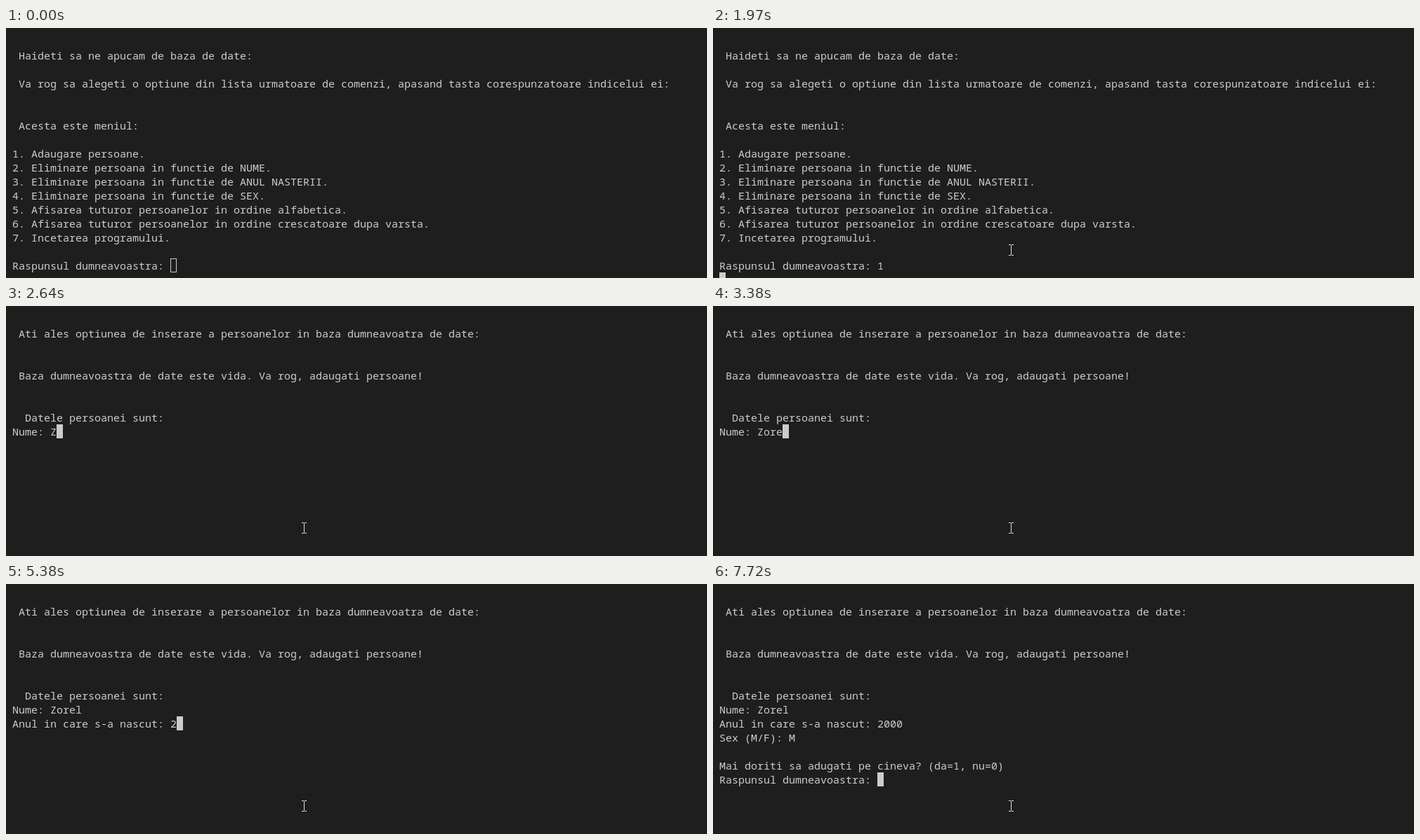
Write an HTML page that moves like this. It is 998 px wide and 357 px high and loops after 8000 ms.

```html
<!DOCTYPE html>
<html lang="ro">
<head>
<meta charset="utf-8">
<title>Terminal</title>
<style>
  html, body { margin: 0; width: 100%; height: 100%; overflow: hidden; background: #1e1e1e; }
  #stage { position: relative; width: 998px; height: 357px; overflow: hidden; background: #1e1e1e; }
  #screen {
    position: absolute; left: 9px; top: 9px; margin: 0; color: #ccc;
    font: 15px/20px "Noto Sans Mono", "DejaVu Sans Mono", monospace;
    font-variant-ligatures: none; white-space: pre;
  }
  #cursor { position: absolute; width: 9px; height: 20px; box-sizing: border-box; background: #ccc; }
  #cursor.hollow { background: none; border: 1px solid #ccc; }
  #pointer { position: absolute; left: 0; top: 0; width: 7px; height: 16px; }
  #pointer path { fill: none; stroke: #e4e4e4; shape-rendering: crispEdges; }
</style>
</head>
<body>
<div id="stage">
  <pre id="screen"></pre>
  <div id="cursor"></div>
  <svg id="pointer" viewBox="0 0 7 16"><path d="M0 .5h3m1 0h3M3.5 1v14M0 15.5h3m1 0h3"/></svg>
</div>
<script>
const LOOP = 8000, CELL = 9, ROW = 20, ORIGIN = 9;
const $ = id => document.getElementById(id);
const screen = $("screen"), cursor = $("cursor"), pointer = $("pointer");

const menu = `
 Haideti sa ne apucam de baza de date:

 Va rog sa alegeti o optiune din lista urmatoare de comenzi, apasand tasta corespunzatoare indicelui ei:


 Acesta este meniul:

1. Adaugare persoane.
2. Eliminare persoana in functie de NUME.
3. Eliminare persoana in functie de ANUL NASTERII.
4. Eliminare persoana in functie de SEX.
5. Afisarea tuturor persoanelor in ordine alfabetica.
6. Afisarea tuturor persoanelor in ordine crescatoare dupa varsta.
7. Incetarea programului.

Raspunsul dumneavoastra: `;

const form = `
 Ati ales optiunea de inserare a persoanelor in baza dumneavoatra de date:


 Baza dumneavoastra de date este vida. Va rog, adaugati persoane!


  Datele persoanei sunt:
Nume: `;

// [time, text to append, true to clear first]
const output = [
  [0, menu, true],
  [1300, "1"],
  [1970, "\n"],
  [2040, form, true],
  [2640, "Z"], [2830, "o"], [2970, "r"], [3380, "e"], [3440, "l"],
  [3840, "\n"],
  [3910, "Anul in care s-a nascut: "],
  [5380, "2"], [5470, "0"], [5600, "0"], [5800, "0"],
  [6270, "\nSex (M/F): "],
  [7260, "M"],
  [7720, "\n\nMai doriti sa adugati pe cineva? (da=1, nu=0)\nRaspunsul dumneavoastra: "]
];
const FOCUS = 1030;

// [time, left, top]
const path = [
  [0, 0, 400], [210, 659, 347], [270, 659, 400],
  [690, 431, 342], [750, 424, 319], [820, 421, 309]
];

function draw(now) {
  const t = now % LOOP;
  const past = step => step[0] <= t;

  const text = output.filter(past).reduce((s, [, add, clear]) => clear ? add : s + add, "");
  if (screen.textContent !== text) screen.textContent = text;

  const lines = text.split("\n");
  cursor.style.left = ORIGIN + lines[lines.length - 1].length * CELL + "px";
  cursor.style.top = ORIGIN + (lines.length - 1) * ROW + "px";
  cursor.className = t < FOCUS ? "hollow" : "";

  const [, x, y] = path.filter(past).pop();
  pointer.style.transform = `translate(${x}px, ${y}px)`;
}

function tick() {
  draw(performance.now());
  requestAnimationFrame(tick);
}
tick();
</script>
</body>
</html>
```
